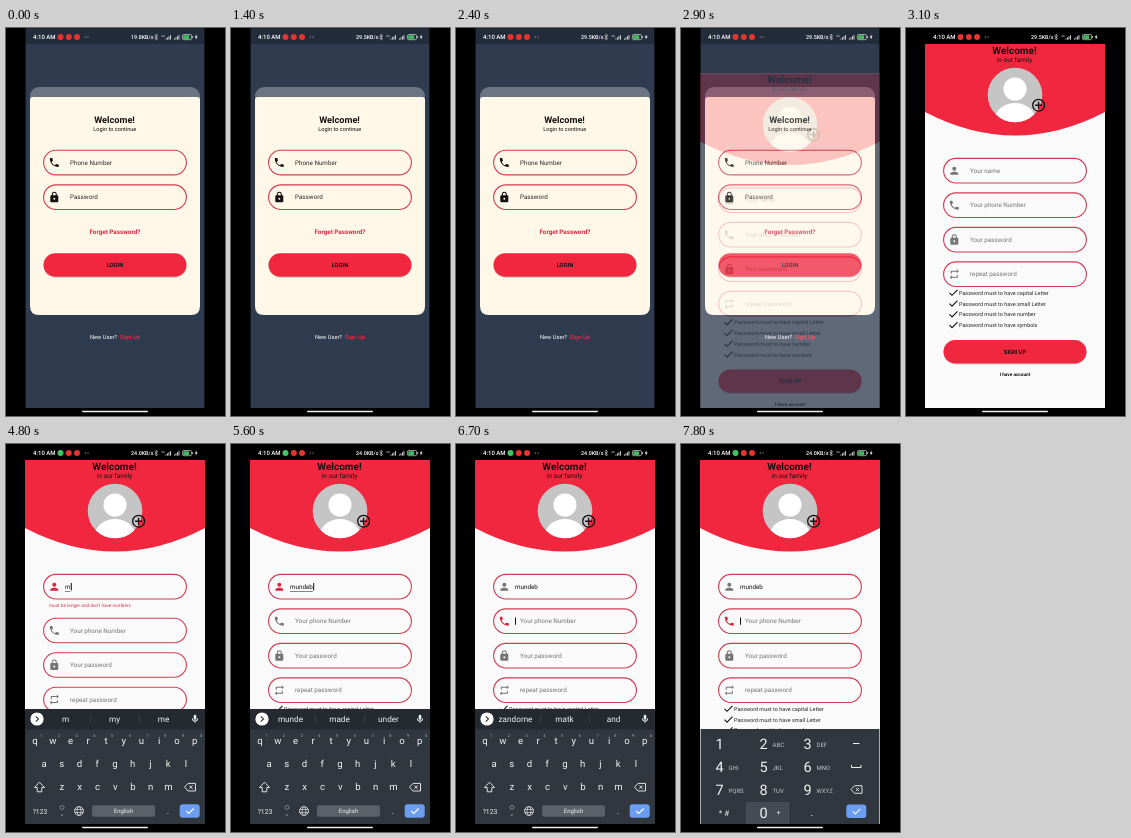
An HTML page for the animation above (8000 ms loop, 219 px wide and 388 px high).

```html
<!DOCTYPE html>
<html lang="en">
<head>
<meta charset="utf-8">
<title>Sign up flow</title>
<style>
  html, body { margin: 0; width: 100%; height: 100%; overflow: hidden; background: #000; }
  svg { display: block; width: 100%; height: 100%; }
  text { font-family: Roboto, sans-serif; text-rendering: geometricPrecision; white-space: pre; }
</style>
</head>
<body>
<svg id="stage" viewBox="0 0 219 388"></svg>
<script>
const LOOP = 8000, STEP = 100;
const RED = '#f0273e', LINE = '#cf3c52', GREY = '#757575', INK = '#111', KEY = '#f1f3f4';

const ICONS = {
  phone: 'M6.6 10.8c1.4 2.8 3.8 5.1 6.6 6.6l2.2-2.2c.3-.3.7-.4 1-.2 1.1.4 2.3.6 3.6.6.6 0 1 .4 1 1V20c0 .6-.4 1-1 1C10.6 21 3 13.4 3 4c0-.6.4-1 1-1h3.5c.6 0 1 .4 1 1 0 1.2.2 2.5.6 3.6.1.3 0 .7-.3 1z',
  lock: 'M18 8h-1V6a5 5 0 0 0-10 0v2H6a2 2 0 0 0-2 2v10a2 2 0 0 0 2 2h12a2 2 0 0 0 2-2V10a2 2 0 0 0-2-2zM9 6a3 3 0 0 1 6 0v2H9zM12 13a2 2 0 1 1 0 4 2 2 0 0 1 0-4z',
  person: 'M12 12a4 4 0 1 0 0-8 4 4 0 0 0 0 8zm0 2c-2.7 0-8 1.3-8 4v2h16v-2c0-2.7-5.3-4-8-4z',
  repeat: 'M7 7h10v3l4-4-4-4v3H5v6h2zM17 17H7v-3l-4 4 4 4v-3h12v-6h-2z',
  mic: 'M12 14a3 3 0 0 0 3-3V5a3 3 0 0 0-6 0v6a3 3 0 0 0 3 3zm5-3a5 5 0 0 1-10 0H5a7 7 0 0 0 6 7v3h2v-3a7 7 0 0 0 6-7z'
};

const rect = (x, y, w, h, fill, r = 0, more = '') =>
  `<rect x="${x}" y="${y}" width="${w}" height="${h}" rx="${r}" fill="${fill}" ${more}/>`;
const circle = (x, y, r, fill, more = '') =>
  `<circle cx="${x}" cy="${y}" r="${r}" fill="${fill}" ${more}/>`;
const shape = (d, fill) => `<path d="${d}" fill="${fill}"/>`;
const stroke = (d, color, width = 1) =>
  `<path d="${d}" fill="none" stroke="${color}" stroke-width="${width}"/>`;
const label = (x, y, size, str, { fill = INK, weight = 400, anchor = 'middle', id = '' } = {}) =>
  `<text x="${x}" y="${y}" font-size="${size}" fill="${fill}" font-weight="${weight}" text-anchor="${anchor}" id="${id}">${str}</text>`;
const left = (x, y, size, str, opts = {}) => label(x, y, size, str, { ...opts, anchor: 'start' });
const icon = (name, x, y, fill, id = '', scale = .5) =>
  `<path id="${id}" d="${ICONS[name]}" fill="${fill}" fill-rule="evenodd" transform="translate(${x - 12 * scale} ${y - 12 * scale}) scale(${scale})"/>`;

function field(cy, name, hint, iconFill, textFill, id = '') {
  return rect(37.6, cy - 12.3, 142.8, 24.6, 'none', 12.3, `stroke="${LINE}" stroke-width="1.1"`)
    + icon(name, 48.3, cy, iconFill, id && id + 'Icon')
    + left(64, cy + 2.2, 6.3, hint, { fill: textFill, id: id && id + 'Hint' });
}

const button = (y, str) =>
  rect(37.5, y + 1, 143, 23.5, '#000', 11.7, 'opacity=".16"')
  + rect(37.5, y, 143, 23.5, RED, 11.7)
  + label(109, y + 13.8, 5.8, str, { weight: 700 });

function statusBar() {
  const bars = (x) => [0, 1, 2, 3].map(i => rect(x + i * 1.5, 10.4 - i * 1.1, .9, 1.2 + i * 1.1, '#ddd')).join('');
  return rect(19.6, 0, 178.8, 16, '#232c3b', 0, 'id="status"')
    + left(27, 11.2, 6, '4:10 AM', { fill: '#fff', weight: 500 })
    + circle(54.5, 9, 3, '#e5342f', 'id="notice"') + circle(62.8, 9, 3, '#e5342f') + circle(71, 9, 3, '#e5342f')
    + circle(79.3, 9, .6, '#ccc') + circle(82, 9, .6, '#ccc')
    + left(125, 11, 5.4, '', { fill: '#fff', weight: 500, id: 'speed' })
    + stroke('M148.6 7.2l3 3.4-1.5 1.5v-6l1.5 1.5-3 3.4', '#ddd', .6)
    + left(155, 8.8, 3, '4G', { fill: '#ddd' }) + bars(159.5) + bars(168)
    + rect(177.2, 7.2, 6, 3.8, '#43b860', .6)
    + rect(176.4, 6.5, 9.2, 5.2, 'none', 1.4, 'stroke="#cfd6d2" stroke-width=".7"')
    + rect(186.3, 8, .8, 2.2, '#cfd6d2')
    + shape('M190.5 6.3l-1.7 3.1h1.3l-.5 2.4 2-3.3h-1.3z', '#fff');
}

function loginPage() {
  return rect(19, 16, 180, 364, '#2f3b4f')
    + rect(24, 59, 170, 60, '#6b7483', 9)
    + shape('M27 69H191q3 0 3 3V278q0 9-9 9H33q-9 0-9-9V72q0-3 3-3z', '#fff8e9')
    + label(108.5, 95.2, 9.2, 'Welcome!', { weight: 700 })
    + label(108.8, 102.8, 5.6, 'Login to continue')
    + field(134.6, 'phone', 'Phone Number', INK, '#2a2a2a')
    + field(169.2, 'lock', 'Password', INK, '#2a2a2a')
    + label(108.9, 206.2, 6.3, 'Forget Password?', { fill: '#dc2a43', weight: 700 })
    + button(225.3, 'LOGIN')
    + left(84, 311, 5.7, 'New User?', { fill: '#fff' })
    + left(113.8, 311, 5.9, 'Sign Up', { fill: RED, weight: 500 });
}

function signupPage() {
  const rules = ['capital Letter', 'small Letter', 'number', 'symbols'].map((rule, i) => {
    const y = 266.8 + i * 10.8;
    return stroke(`M43.5 ${y - 2}l2.5 2.5 5.5-5.5`, INK, 1.1)
      + left(53, y, 5.45, 'Password must to have ' + rule, { fill: '#222' });
  }).join('');
  return rect(19, 16, 180, 364, '#fafafa')
    + shape('M19 16H199V84Q109 131 19 84z', RED)
    + label(108.5, 25.8, 10, 'Welcome!', { weight: 700 })
    + label(108.5, 34, 6.5, 'in our family')
    + circle(109, 67, 27.3, '#c5c5c5')
    + `<g clip-path="url(#face)">${circle(109, 61, 11.5, '#fff')}<ellipse cx="109" cy="91" rx="20" ry="16" fill="#fff"/></g>`
    + circle(132.6, 77.2, 5.9, 'none', `stroke="${INK}" stroke-width="1.3"`)
    + stroke('M132.6 73.7v7M129.1 77.2h7', INK, 1.4)
    + field(142.7, 'person', 'Your name', GREY, GREY, 'name')
    + left(59, 144.9, 6.3, '', { id: 'value' })
    + rect(59, 147, 0, .5, INK, 0, 'id="underline"')
    + rect(59, 139, 1, 7.4, INK, 0, 'id="nameCaret"')
    + left(43, 163.3, 4.7, "must be longer and don't have numbers", { fill: '#d8304a', id: 'error' })
    + '<g id="below">'
    + field(177.2, 'phone', 'Your phone Number', GREY, GREY, 'phone')
    + rect(59, 173.5, 1, 7.2, INK, 0, 'id="phoneCaret"')
    + field(211.7, 'lock', 'Your password', GREY, GREY)
    + field(246.2, 'repeat', 'repeat password', GREY, GREY)
    + rules + button(312, 'SIGN UP')
    + label(109, 348.4, 4.7, 'I have account', { weight: 700 })
    + '</g>';
}

const backspace = (x, y) =>
  stroke(`M${x - 5.5} ${y}l3.5-3.8h7.5v7.6h-7.5zM${x - .6} ${y - 1.6}l3.2 3.2m0-3.2l-3.2 3.2`, KEY, .9);
const enter = (x, y) =>
  rect(x - 10, y - 6.7, 20, 13.4, '#6b9df0', 3) + stroke(`M${x - 3.5} ${y}l2.5 2.5 5-5`, '#fff', 1.1);

function letterKeys() {
  const row = (keys, x, y) => [...keys].map((k, i) => label(x + i * 17.75, y, 9.6, k, { fill: KEY })).join('');
  const digits = [...'1234567890'].map((d, i) => label(35.2 + i * 17.75, 292.6, 3.9, d, { fill: '#aeb3b9' })).join('');
  const words = [59.5, 108.5, 157.5].map((x, i) => label(x, 278, 8.2, '', { fill: KEY, id: 'word' + i })).join('');
  return rect(19, 265, 180, 115, '#31373e') + rect(19, 265, 180, 20.5, '#252a30')
    + circle(31, 275, 6.6, '#fff') + stroke('M29.8 272.3l2.7 2.7-2.7 2.7', '#333', 1.1)
    + rect(84, 271, .5, 8, '#4a5058') + rect(133, 271, .5, 8, '#4a5058')
    + words + icon('mic', 189, 275, KEY, '', .43)
    + row('qwertyuiop', 29, 300.2) + digits
    + row('asdfghjkl', 38, 323.3) + row('zxcvbnm', 56, 346.2)
    + stroke('M33.5 338.2l5 5.3h-2.7v4.3h-4.6v-4.3h-2.7z', KEY, .9)
    + backspace(184, 343.2)
    + label(34, 369.6, 6.8, '?123', { fill: KEY })
    + circle(56, 363.5, 2, 'none', 'stroke="#aeb3b9" stroke-width=".6"')
    + label(56, 371, 7.5, ',', { fill: KEY })
    + circle(73, 367, 4.4, 'none', `stroke="${KEY}" stroke-width=".8"`)
    + `<ellipse cx="73" cy="367" rx="1.9" ry="4.4" fill="none" stroke="${KEY}" stroke-width=".6"/>`
    + stroke('M68.6 365.5h8.8m0 3h-8.8', KEY, .6)
    + rect(86, 361.3, 63, 11.4, '#5b6169', 2)
    + label(117.5, 369.2, 6, 'English', { fill: KEY })
    + label(162, 369.6, 9, '.', { fill: KEY }) + enter(183.7, 367);
}

function numberKeys() {
  const hints = ['', 'ABC', 'DEF', 'GHI', 'JKL', 'MNO', 'PQRS', 'TUV', 'WXYZ'];
  const pad = hints.map((hint, i) => {
    const x = 38.5 + i % 3 * 44, y = 304.5 + Math.floor(i / 3) * 23;
    return label(x, y, 14.5, i + 1, { fill: KEY }) + left(x + 9, y - 2, 6, hint, { fill: '#c3c7cc' });
  }).join('');
  return rect(19, 285, 180, 95, '#31373e') + rect(65, 358, 43.5, 22, '#444b53') + pad
    + label(43, 371.5, 8, '* #', { fill: KEY })
    + label(82.5, 373.8, 14.5, '0', { fill: KEY }) + label(97.5, 371.3, 7, '+', { fill: KEY })
    + label(131, 371.8, 11, '.', { fill: KEY })
    + stroke('M172 299.5h6.5', KEY, 1)
    + stroke('M170.5 321v2.5h9.5v-2.5', KEY, 1)
    + backspace(175.5, 345.5) + enter(175.3, 367.3);
}

const stage = document.getElementById('stage');
stage.innerHTML = `<defs>
  <clipPath id="screen">${rect(19.6, 16, 178.8, 364, '#000')}</clipPath>
  <clipPath id="face">${circle(109, 67, 27.3, '#000')}</clipPath></defs>
  ${rect(0, 0, 219, 388, '#000')}
  <g clip-path="url(#screen)">
    <g>${loginPage()}</g><g id="signup">${signupPage()}</g>
    <g id="letters">${letterKeys()}</g><g id="numbers">${numberKeys()}</g>
  </g>
  ${statusBar()}${rect(76, 382.7, 66, 1.5, '#eee', .7)}`;

const $ = id => document.getElementById(id);
const show = (id, on) => $(id).setAttribute('visibility', on ? 'visible' : 'hidden');
const within = (t, from, to) => t >= from && t < to;
// Latest value whose start time has been reached.
const at = (t, steps) => steps.filter(([start]) => start <= t).pop()[1];

const TYPED = [[0, ''], [4700, 'm'], [4900, 'mu'], [5000, 'mun'], [5200, 'mund'], [5400, 'munde'], [5600, 'mundeb']];
const WORDS = [[0, 'I The I\'m'], [4700, 'm my me'], [4900, 'mu much must'], [5000, 'mun much mind'],
  [5200, 'mund mind mud'], [5400, 'munde made under'], [5900, 'mundeb under made'], [6500, 'zandome matk and']];

const motions = [
  $('signup').animate({ transform: ['translateY(91px)', 'translateY(0)'] },
    { delay: 2770, duration: 300, easing: 'cubic-bezier(.4,0,.2,1)', fill: 'both' }),
  $('signup').animate({ opacity: [0, 1] },
    { delay: 2770, duration: 300, easing: 'ease-in', fill: 'both' }),
  $('letters').animate({ transform: ['translateY(116px)', 'translateY(0)'] },
    { delay: 3750, duration: 300, easing: 'cubic-bezier(0,0,.2,1)', fill: 'both' })
];
motions.forEach(m => m.pause());

function render(t) {
  motions.forEach(m => { m.currentTime = t; });
  show('status', t < 3000);
  $('speed').textContent = at(t, [[0, '19.8KB/s'], [300, '29.5KB/s'], [4300, '24.0KB/s']]);
  $('notice').setAttribute('fill', t < 4300 ? '#e5342f' : '#43c463');

  const onName = within(t, 3700, 6500), onPhone = t >= 6500, typed = at(t, TYPED);
  $('nameIcon').setAttribute('fill', onName ? '#d8263f' : GREY);
  $('phoneIcon').setAttribute('fill', onPhone ? '#d8263f' : GREY);
  $('value').textContent = typed;
  show('nameHint', !typed);
  const width = typed ? $('value').getComputedTextLength() : 0;
  $('underline').setAttribute('width', onName ? width : 0);
  $('nameCaret').setAttribute('x', 59 + width + (typed ? .3 : 0));
  show('nameCaret', onName && !within(t, 4200, 4600) && !within(t, 6000, 6400));
  show('phoneCaret', onPhone && !within(t, 7200, 7600));

  const invalid = typed.length > 0 && typed.length < 4;
  show('error', invalid);
  $('below').setAttribute('transform', `translate(0 ${invalid ? 9.3 : 0})`);

  at(t, WORDS).split(' ').forEach((word, i) => { $('word' + i).textContent = word; });
  show('letters', t < 6800);
  show('numbers', t >= 6800);
}

const origin = performance.now();
function tick() {
  const t = (performance.now() - origin) % LOOP;
  render(Math.floor(t / STEP) * STEP);
  requestAnimationFrame(tick);
}
tick();
</script>
</body>
</html>
```
